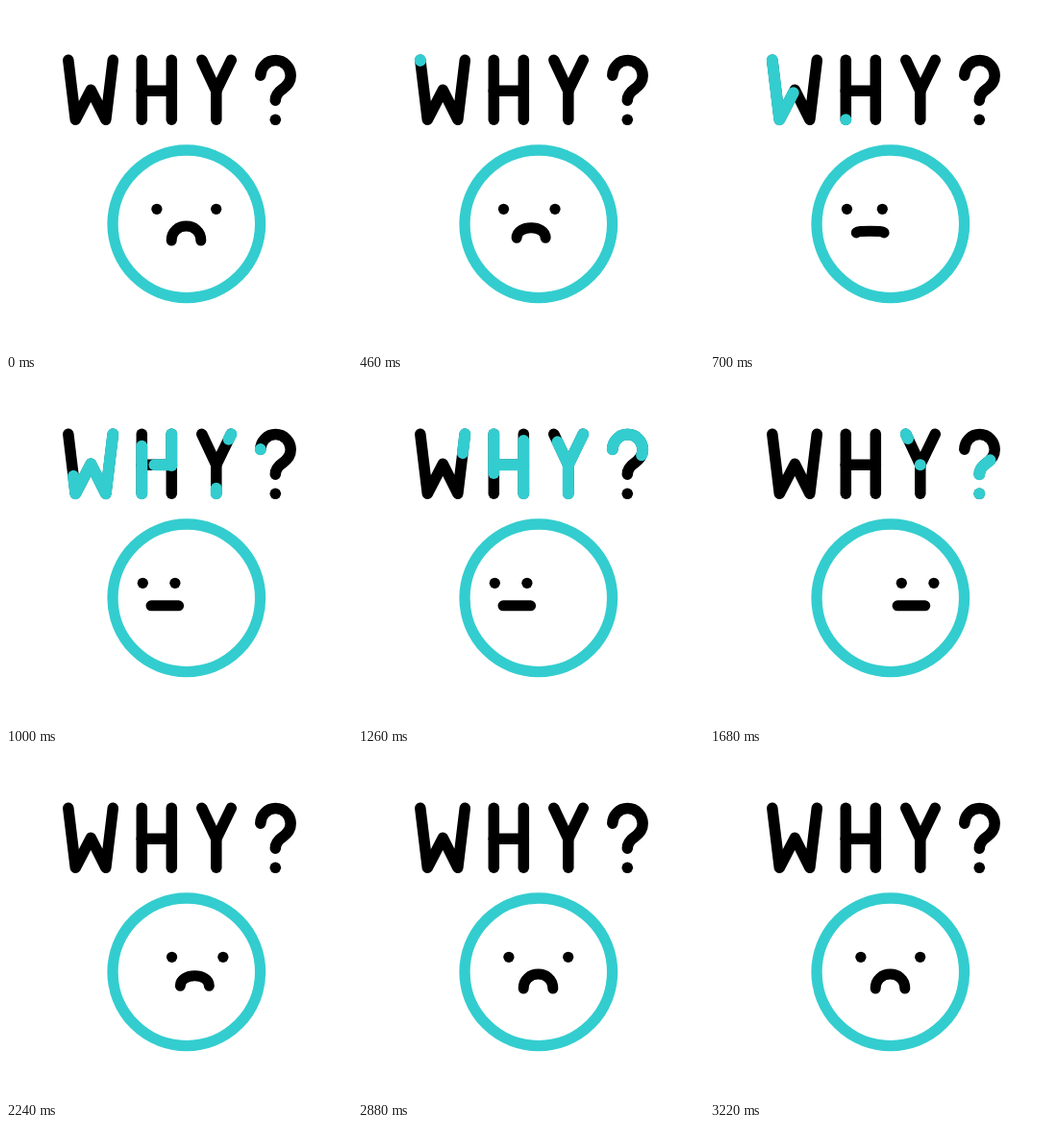
Recreate the animation shown at these times as an HTML page. Size 360 by 360 pixels, loop 3.62 s.

```html
<!DOCTYPE html>
<html lang="en">
<head>
<meta charset="utf-8">
<title>Why?</title>
<style>
  html, body { margin: 0; width: 100%; height: 100%; overflow: hidden; background: #fff; }
  svg { display: block; width: 100vw; height: 100vh; }
  path { fill: none; stroke-width: 11.5; stroke-linecap: round; stroke-linejoin: round; }
  .ink path { stroke: #000; }
  .glow path { stroke: #33cdcf; stroke-width: 12; }
  .glow circle { fill: #33cdcf; }
</style>
</head>
<body>
<svg viewBox="-.3 -.3 360 360" role="img" aria-label="Why?">
  <g class="ink" id="ink"><circle cx="280" cy="118" r="5.8"/></g>
  <g class="glow" id="glow"><circle id="dot" cx="280" cy="118"/></g>
  <circle cx="187.5" cy="226.5" r="76.8" fill="none" stroke="#33cdcf" stroke-width="11.3"/>
  <g class="ink">
    <circle id="eyeL" cy="211" r="5.6"/>
    <circle id="eyeR" cy="211" r="5.6"/>
    <path id="mouth" style="stroke-width:11"/>
  </g>
</svg>
<script>
const LOOP = 3620;
const HOLD = 395; // wait between drawing and erasing a stroke
const $ = id => document.getElementById(id);

const STROKES = [
  "M64.5 56L72 118L88 87L103.5 118L111 56",
  "M141 118V56",
  "M172 88H141",
  "M172 56V118",
  "M234 56L218.5 88L203.5 56",
  "M218.5 118V88",
  "M264.5 72a15.7 15.7 0 0 1 31.4 0C296 79 292 83 287 86.5C282 90 280 93 280 98"
];

// smooth step from 0 to 1
function ramp(t, from, to) {
  const p = Math.min(1, Math.max(0, (t - from) / (to - from)));
  return p * p * (3 - 2 * p);
}

function addPath(parent, d) {
  const path = document.createElementNS("http://www.w3.org/2000/svg", "path");
  path.setAttribute("d", d);
  return $(parent).appendChild(path);
}

// Strokes further right start later; longer ones take more time.
const trims = STROKES.map(d => {
  addPath("ink", d);
  const path = addPath("glow", d);
  const length = path.getTotalLength();
  const start = 66 * Math.sqrt(path.getPointAtLength(0).x) - 86;
  return { path, length, start, span: 380 + 0.75 * length };
});

function trim({ path, length, start, span }, t) {
  const head = length * ramp(t, start, start + span);
  const tail = length * ramp(t, start + HOLD, start + HOLD + span);
  path.style.display = head > tail ? "" : "none";
  path.setAttribute("stroke-dasharray", `${head - tail} ${2 * length}`);
  path.setAttribute("stroke-dashoffset", -tail);
}

// turn: -1 looks left, 1 looks right; sad: 1 frowns, 0 is flat
function drawFace(t) {
  const turn = 2 * ramp(t, 1300, 1700) - ramp(t, 260, 780) - ramp(t, 1900, 2500);
  const sad = 1 - ramp(t, 260, 820) + ramp(t, 1860, 2460);

  const mid = 187.5 + 28.7 * turn, gap = 16.8 + 14.1 * sad;
  $("eyeL").setAttribute("cx", mid - gap);
  $("eyeR").setAttribute("cx", mid + gap);

  const x = 187.2 + 22.2 * turn, w = 14.3 + sad;
  const y = 234.5 + 9.3 * sad, top = y - 20 * sad;
  $("mouth").setAttribute("d", `M${x - w} ${y}C${x - w} ${top} ${x + w} ${top} ${x + w} ${y}`);
}

function render(t) {
  trims.forEach(s => trim(s, t));
  $("dot").setAttribute("r", 6 * (ramp(t, 1300, 1480) - ramp(t, 1760, 1940)));
  drawFace(t);
}

const begin = performance.now();
function tick() {
  render((performance.now() - begin) % LOOP);
  requestAnimationFrame(tick);
}
tick();
</script>
</body>
</html>
```
